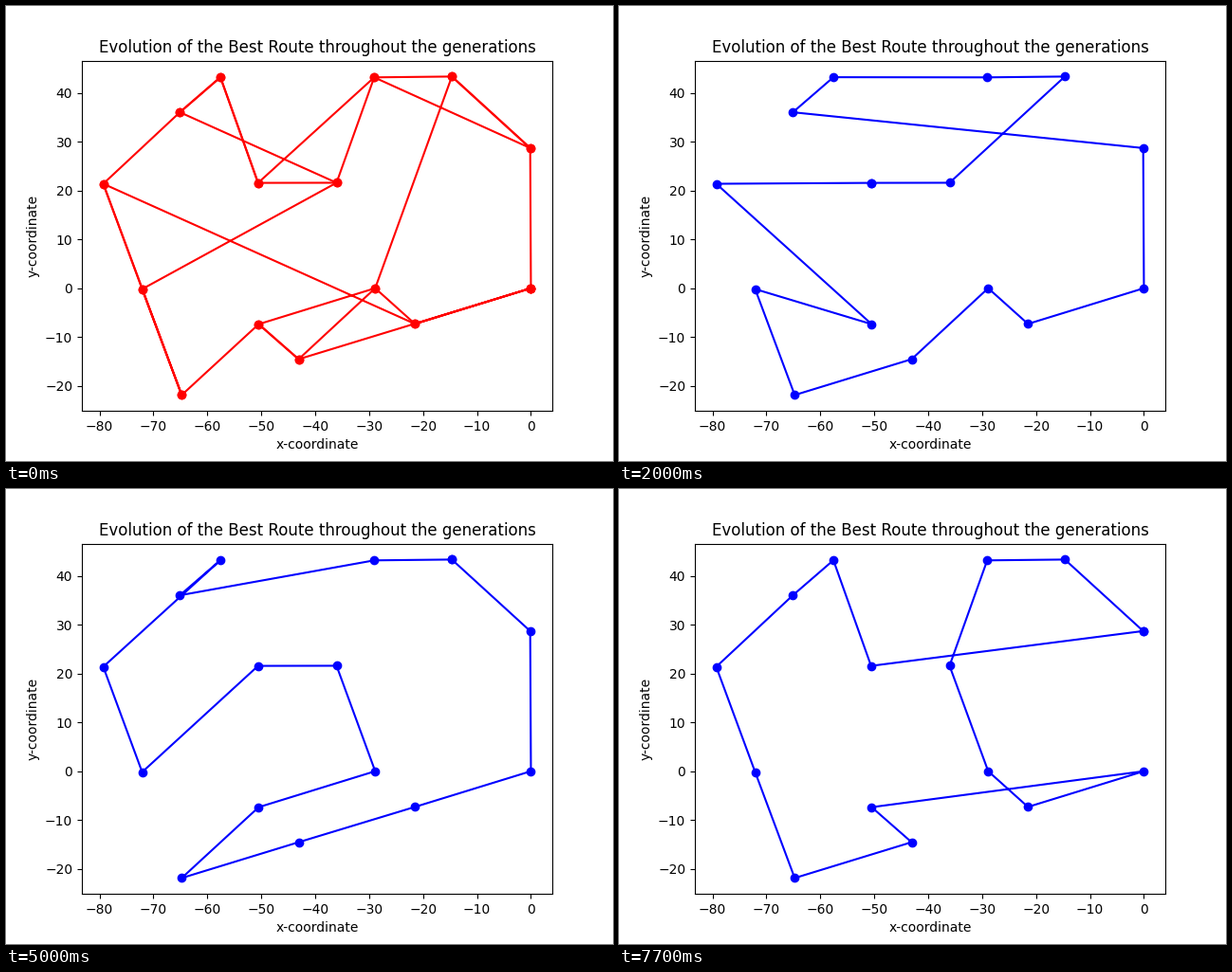
Write a matplotlib script that moves like this. It is 640 by 480 pixels and loops after 8000 ms.

```python
import matplotlib.pyplot as plt
from matplotlib.animation import FuncAnimation

STEP = 100
LOOP = 8000

# Cities are named A to O, in the order of the shortest round trip.
POINTS = [
    (0.0, 0.0), (-0.1358, 28.7293), (-14.6577, 43.3895),
    (-29.0585, 43.2167), (-36.0366, 21.6135), (-50.5859, 21.5882),
    (-57.5687, 43.2506), (-65.0866, 36.0625), (-79.2916, 21.4033),
    (-72.0785, -0.1816), (-64.7473, -21.8982), (-50.4808, -7.3745),
    (-43.0700, -14.5548), (-28.8733, 0.0), (-21.4983, -7.3194),
]
CITIES = dict(zip("ABCDEFGHIJKLMNO", POINTS))

# (start in ms, colour, routes drawn together)
STAGES = [
    (0, "red", ["AOIKJEHGFDBCNLM", "ABCDEFGHIJKLMNO"]),
    (100, "blue", ["ABEFDGCHIJNKLMO"]),
    (400, "blue", ["ABFEDCHIGJNLKMO"]),
    (900, "blue", ["KMOABGHCDEFIJNL"]),
    (1500, "blue", ["DHGIFEJLKMNOBAC"]),
    (1900, "blue", ["ABGHDCEFILJKMNO"]),
    (2000, "blue", ["FILJKMNOABHGDCE"]),
    (2400, "blue", ["FILJKMNOACDBEGH"]),
    (2500, "blue", ["FLIJKMNOACDBEGH"]),
    (2700, "blue", ["BCENOAFJKMLIHGD"]),
    (3900, "blue", ["BCDFGHIJENLKMOA"]),
    (5000, "blue", ["CDHGIJFENLKMOAB"]),
    (5500, "blue", ["EBCDFGHIJLKMAON"]),
    (6600, "blue", ["JIHGFKMLNOABCDE"]),
    (7700, "blue", ["BCDENOALMKJIHGF"]),
]


def closed_path(route):
    """Coordinates of a route that returns to its first city."""
    return zip(*(CITIES[c] for c in route + route[0]))


fig, ax = plt.subplots(figsize=(6.4, 4.8), dpi=100)
ax.set_title("Evolution of the Best Route throughout the generations")
ax.set_xlabel("x-coordinate")
ax.set_ylabel("y-coordinate")
lines = [ax.plot(*closed_path("ABCDEFGHIJKLMNO"), "o-")[0] for _ in range(2)]


def draw(frame):
    now = frame * STEP
    _, color, routes = [s for s in STAGES if s[0] <= now][-1]
    for i, line in enumerate(lines):
        line.set_visible(i < len(routes))
        if i < len(routes):
            line.set_data(*map(list, closed_path(routes[i])))
            line.set_color(color)
    return lines


anim = FuncAnimation(fig, draw, frames=LOOP // STEP, interval=STEP,
                     repeat=True, repeat_delay=0)
plt.show()
```
